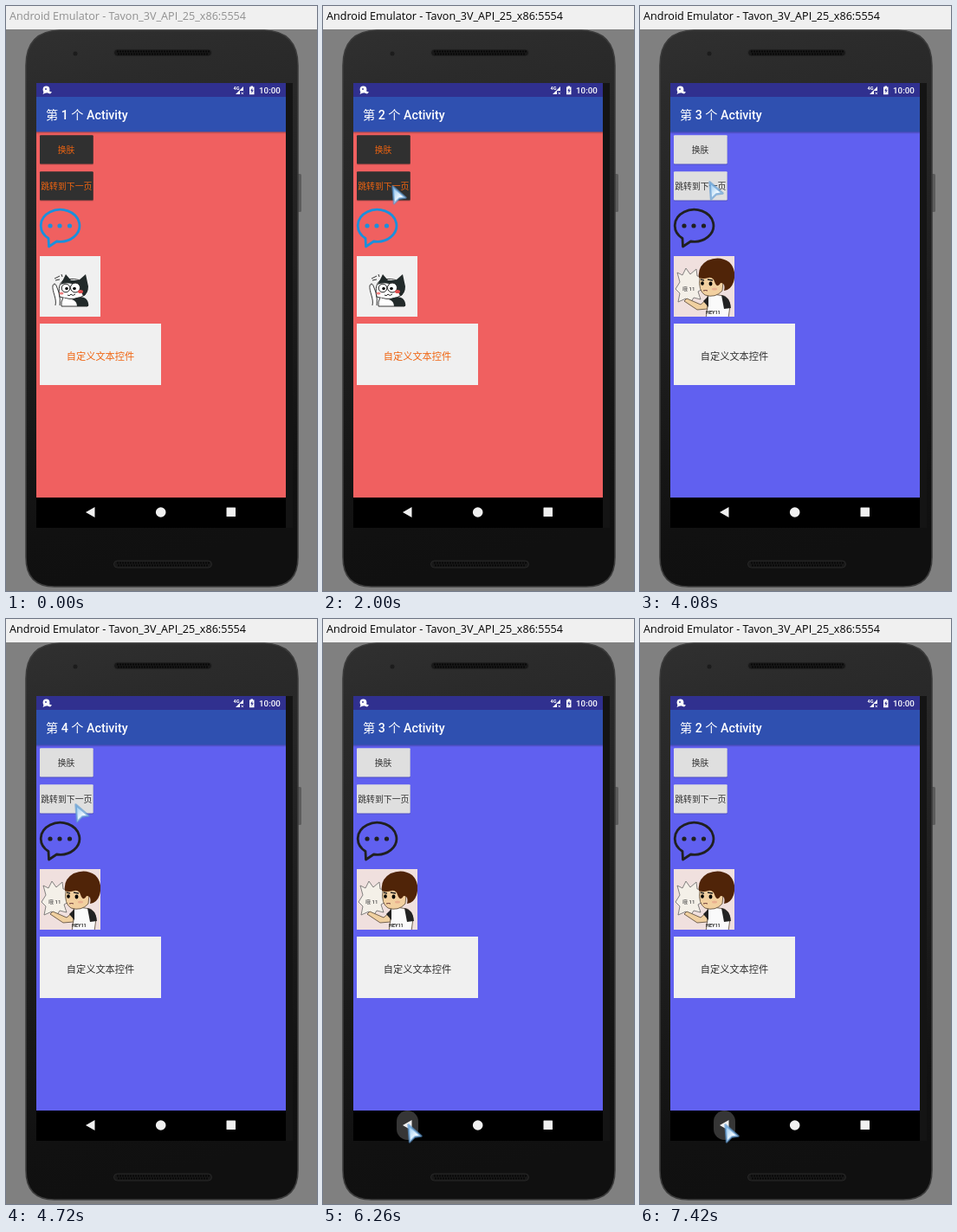
An HTML page that plays this animation: 359 by 676 pixels, repeating every 8 s.

```html
<!DOCTYPE html>
<html lang="zh">
<head>
<meta charset="utf-8">
<title>Skin switching</title>
<style>
html, body { margin: 0; width: 100%; height: 100%; overflow: hidden; background: #808080; }
svg { display: block; width: 359px; height: 676px; }
text { font-family: Roboto, "Noto Sans CJK SC", "Noto Sans CJK", sans-serif; }
.red { --page: #f06060; --btn: #303030; --ink: #f06410; --icon: #1a90dc; }
.blue { --page: #6060f0; --btn: #dfdfdf; --ink: #303030; --icon: #202020; }
.red .boy, .blue .cat { display: none; }
.page { fill: var(--page); }
.btn { fill: var(--btn); }
.label { fill: var(--ink); text-anchor: middle; }
.line { fill: none; stroke: var(--icon); stroke-width: 2.8; stroke-linejoin: round; }
.dot { fill: var(--icon); }
</style>
</head>
<body>
<svg id="stage" viewBox="0 0 359 676" class="red">
  <defs>
    <linearGradient id="body" x1="0" y1="0" x2="0.12" y2="1">
      <stop offset="0" stop-color="#303030"/>
      <stop offset="0.12" stop-color="#2b2b2b"/>
      <stop offset="0.5" stop-color="#202020"/>
      <stop offset="0.9" stop-color="#111"/>
      <stop offset="1" stop-color="#101010"/>
    </linearGradient>
    <linearGradient id="shade" x1="0" y1="0" x2="0" y2="1">
      <stop offset="0" stop-opacity="0.25"/>
      <stop offset="1" stop-opacity="0"/>
    </linearGradient>
    <linearGradient id="glass" x1="0" y1="0" x2="1" y2="1">
      <stop offset="0.15" stop-color="#a4cff2"/>
      <stop offset="0.6" stop-color="#f0f9ff"/>
    </linearGradient>
    <clipPath id="view"><rect x="35" y="89" width="288" height="479"/></clipPath>
    <clipPath id="photo"><rect x="39" y="289" width="70" height="70"/></clipPath>
  </defs>

  <rect width="359" height="676" fill="#808080"/>
  <rect width="359" height="27" fill="#f0f0f0"/>
  <text id="caption" x="4" y="16" style="font:12.6px 'Open Sans','Noto Sans',sans-serif">Android Emulator - Tavon_3V_API_25_x86:5554</text>

  <rect x="335" y="194" width="6" height="44" rx="1.500" fill="#5c5c5c"/>
  <path d="M62 28H298Q337 29 337 69V637Q337 671 304 671H56Q23 671 23 637V69Q23 29 62 28Z" fill="url(#body)" stroke="#3c3c3c" stroke-width="1.600"/>
  <rect x="323" y="89" width="8" height="514" fill="#141414"/>
  <circle cx="80" cy="55" r="2.500" fill="#1c1c1c"/>
  <g id="grilles"></g>
  <rect x="35" y="89" width="288" height="514" fill="#000"/>

  <g clip-path="url(#view)">
    <g id="base"></g>
    <g id="top"></g>
  </g>

  <g fill="#fff">
    <circle cx="46.500" cy="96.500" r="3.900"/>
    <path d="M44 98l-1.500 4 4-2zM49 98l4 1.500-2 2-3-1z"/>
    <circle cx="46" cy="96" r="0.900" fill="#30308f"/>
    <text x="262.500" y="97" font-size="5.500" font-weight="700">4G</text>
    <path d="M265 102L274 93V98H270V102Z"/>
    <path d="M271.500 99.500l2.500 2.500m0-2.500l-2.500 2.500" stroke="#fff" stroke-width="0.800"/>
    <path d="M281 93.500h1.500v-1h2.500v1h1.500v8.700h-5.500z"/>
    <path d="M284.400 94.500l-2.200 3.800h1.400v2.700l2-3.800h-1.200z" fill="#30308f"/>
    <text x="292" y="101" font-size="9.800" font-weight="500">10:00</text>
  </g>

  <rect id="ripple" x="85" y="568" width="25" height="34" rx="12.500" fill="#363636"/>
  <g fill="#f0f0f0">
    <path d="M92 585L102.500 579V591Z"/>
    <circle cx="178.700" cy="585" r="5.800"/>
    <rect x="254.500" y="579.500" width="10.500" height="10.500" rx="0.500"/>
  </g>

  <path id="cursor" d="M1.500 1.500L16.500 14.500L9 15.500L3 21.500Z" fill="url(#glass)" stroke="#5a96d0" stroke-opacity="0.650" stroke-width="2.400" stroke-linejoin="round"/>
</svg>
<script>
const LOOP = 8000;
const $ = id => document.getElementById(id);
const stage = $('stage');

const rect = (x, y, w, h, attrs) =>
  `<rect x="${x}" y="${y}" width="${w}" height="${h}" ${attrs}/>`;
const label = (x, y, size, text) =>
  `<text class="label" x="${x}" y="${y}" font-size="${size}">${text}</text>`;

const cat = `<g class="cat">
  ${rect(39, 289, 70, 70, 'fill="#f0f0f0"')}
  <g fill="none" stroke="#222" stroke-width="0.900">
    <path d="M56 315l6-3M57 317l5-1M64 310l1 3"/>
    <path d="M57 346C59 338 53 330 54 323q2-4 4 0l3 8q2 8 1 15" fill="#fff"/>
    <path d="M62 336C60 326 62 320 66 317Q79 313 90 319Q95 326 91 334Q80 341 66 337Z" fill="#fff"/>
    <path d="M66 337Q63 342 64 347H94" fill="#fff"/>
  </g>
  <path d="M63 322L69 310L75 317H84L92 310L95 324Q95 333 89 335Q84 323 76 321Q69 319 63 322Z" fill="#222a2a"/>
  <path d="M76 339Q87 334 92 338Q96 342 95 347H82Q82 341 76 339Z" fill="#222a2a"/>
  <g fill="#fff" stroke="#222" stroke-width="1"><circle cx="69" cy="326" r="4.800"/><circle cx="80" cy="325.500" r="5.500"/></g>
  <circle cx="70" cy="326.500" r="1.700"/><circle cx="79" cy="326.500" r="1.800"/>
  <path d="M71 334q2 2 4-1q2 3 5 0" fill="none" stroke="#222"/>
  <ellipse cx="64" cy="332" rx="2.500" ry="1.500" fill="#f08080"/>
  <ellipse cx="86" cy="330" rx="3" ry="2" fill="#e05050"/>
</g>`;

const boy = `<g class="boy" clip-path="url(#photo)">
  ${rect(39, 289, 70, 70, 'fill="#f0e0de"')}
  <path d="M43 308L49 311L53 303L58 310L65 304L66 312L73 313L69 319L72 327L67 330L70 339L62 337L57 345L53 338L44 342L46 332L41 327L46 319Z" fill="#f4f0e8" stroke="#666" stroke-width="0.800"/>
  <text x="49" y="329" font-size="6" font-weight="500" fill="#444">哦 11</text>
  <g stroke="#543" stroke-width="0.800">
    <path d="M78 338L70 345L54 338L51 341L66 351L78 350Z" fill="#f0d0a0"/>
    <path d="M78 335Q88 332 97 335Q103 338 104 346L102 361H76L78 348Z" fill="#fafafa"/>
  </g>
  <path d="M94 334Q104 336 105 349L97 350ZM79 335L73 341L79 348Z" fill="#222"/>
  <path d="M69 314Q67 329 75 334Q87 338 95 329L97 308H72Z" fill="#f2d0a0" stroke="#543" stroke-width="0.800"/>
  <path d="M68 314Q66 301 78 294Q92 288 103 296Q112 305 108 319Q105 328 97 329Q99 320 93 320Q90 326 87 321L85 316Q82 313 79 314Q73 316 68 314Z" fill="#502408"/>
  <path d="M70 316l4 1M78 316l6 1" stroke="#222" stroke-width="1.300"/>
  <ellipse cx="72" cy="320.500" rx="1.800" ry="2.300"/>
  <ellipse cx="81.500" cy="321" rx="2" ry="2.400"/>
  <path d="M73 329q3-1 5 0" fill="none" stroke="#633"/>
  <ellipse cx="86" cy="327" rx="3" ry="1.500" fill="#eab090"/>
  <text x="76" y="356" font-size="5.500" font-weight="700" fill="#222">HEY11</text>
</g>`;

const pageMarkup = `
  ${rect(35, 145, 288, 458, 'class="page"')}
  ${rect(35, 89, 288, 16, 'fill="#30308f"')}
  ${rect(35, 105, 288, 40.5, 'fill="#2f50b0"')}
  ${rect(35, 145.5, 288, 2.5, 'fill="url(#shade)"')}
  <text class="heading" x="46" y="131" font-size="14.200" font-weight="500" fill="#fff"></text>
  ${[149, 191].map(y => rect(39, y + 1, 62, 33.5, 'rx="1" opacity="0.2"') + rect(39, y + 0.3, 61.7, 33.2, 'rx="1" class="btn"')).join('')}
  ${label(69.5, 169.700, 9.800, '换肤')}
  ${label(69.8, 211.700, 9.900, '跳转到下一页')}
  <path class="line" d="M49 268.500A22.300 18.500 0 1 1 58.500 272L49.500 278Z"/>
  ${[51, 62, 73.500].map(x => `<circle class="dot" cx="${x}" cy="254" r="2.600"/>`).join('')}
  ${cat}${boy}
  ${rect(39, 367, 140, 71, 'fill="#f0f0f0"')}
  ${label(109, 409, 11.200, '自定义文本控件')}`;

for (const id of ['base', 'top']) $(id).innerHTML = pageMarkup;
$('grilles').innerHTML = [50, 641].map(y =>
  rect(124.5, y, 113, 8, 'rx="4" fill="#181818" stroke="#2c2c2c" stroke-width="0.800"') +
  `<path d="M128 ${y + 2.500}H235M129 ${y + 5.500}H234" stroke="#080808" stroke-width="1.800" stroke-dasharray="2 1"/>`
).join('');

// Page changes: start, end, from, to
const turns = [
  [860, 1060, 1, 2], [2020, 2220, 2, 3], [4560, 4720, 3, 4],
  [6100, 6260, 4, 3], [7220, 7420, 3, 2]
];

// Pointer moves: start, end, x, y
const moves = [
  [20, 20, 15, 289], [240, 460, 79, 207], [2040, 2200, 79, 195],
  [2860, 3000, 77, 163], [3940, 4080, 79, 202], [4560, 4700, 79, 213],
  [5420, 5820, 97, 583]
];

const progress = (t, a, b) => b > a ? Math.min(1, Math.max(0, (t - a) / (b - a))) : +(t >= a);
const smooth = p => p * p * (3 - 2 * p);

function setPage(id, number, y = 0, opacity = 1) {
  const page = $(id);
  page.querySelector('.heading').textContent = `第 ${number} 个 Activity`;
  page.setAttribute('transform', `translate(0 ${y})`);
  page.setAttribute('opacity', opacity);
}

function drawPages(t) {
  let current = 1, turn = null;
  for (const [start, end, from, to] of turns) {
    if (t >= end) current = to;
    else if (t >= start) turn = [progress(t, start, end), from, to];
  }
  if (!turn) {
    setPage('base', current);
    setPage('top', current, 0, 0);
    return;
  }
  const [p, from, to] = turn;
  const opening = to > from;
  setPage('base', Math.min(from, to));
  if (opening) setPage('top', to, 41 * (1 - p) ** 3, Math.min(1, p * 1.6));
  else setPage('top', from, 41 * p * p, 1 - p);
}

function drawCursor(t) {
  let [, , x, y] = moves[0];
  for (const [start, end, toX, toY] of moves) {
    const p = smooth(progress(t, start, end));
    x += (toX - x) * p;
    y += (toY - y) * p;
  }
  $('cursor').setAttribute('transform', `translate(${x} ${y})`);
  $('cursor').setAttribute('opacity', +(t >= 20));
}

function draw(t) {
  stage.setAttribute('class', t < 3260 ? 'red' : 'blue');
  $('caption').setAttribute('fill', t < 240 ? '#909090' : '#000');
  $('ripple').setAttribute('opacity', progress(t, 6080, 6180));
  drawPages(t);
  drawCursor(t);
}

const origin = performance.now();
function tick() {
  draw((performance.now() - origin) % LOOP);
  requestAnimationFrame(tick);
}
tick();
</script>
</body>
</html>
```
